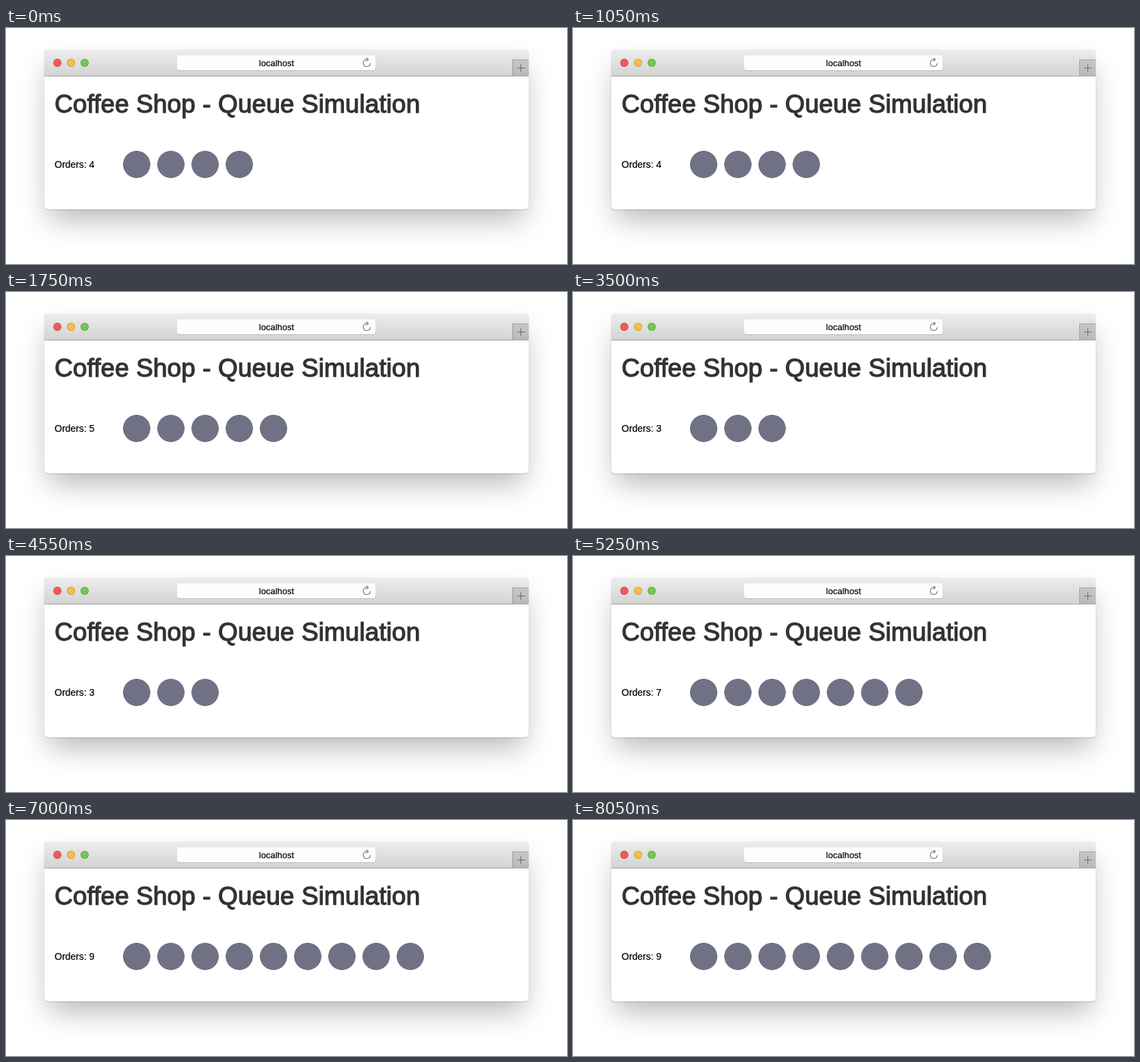
These frames come from a looping animation (820 px wide and 346 px high, 8.75 s). An HTML page:

```html
<!DOCTYPE html>
<html lang="en">
<head>
<meta charset="utf-8">
<title>Queue Simulation</title>
<style>
  @property --orders {
    syntax: "<integer>";
    inherits: true;
    initial-value: 4;
  }

  html, body {
    margin: 0;
    width: 100%;
    height: 100%;
    overflow: hidden;
    background: #fff;
  }

  body {
    position: relative;
    font-family: "Liberation Sans", Arial, sans-serif;
    color: #000;
  }

  body * { position: absolute; box-sizing: border-box; }

  .window {
    left: 56px;
    top: 32px;
    width: 708px;
    height: 234px;
    border-radius: 5px;
    background: #fff;
    box-shadow:
      0 0 1px rgba(0, 0, 0, .3),
      0 1px 1px rgba(0, 0, 0, .14),
      0 21px 40px -7px rgba(0, 0, 0, .29);
  }

  .toolbar {
    width: 708px;
    height: 39px;
    border-radius: 5px 5px 0 0;
    border-bottom: 1px solid #a2a2a2;
    background: linear-gradient(#ededed, #d3d3d3);
  }

  .light {
    top: 13px;
    width: 12px;
    height: 12px;
    border-radius: 50%;
    border: 1px solid rgba(0, 0, 0, .15);
  }
  .close { left: 13px; background: #ee5b54; }
  .minimize { left: 33px; background: #f5bd47; }
  .zoom { left: 53px; background: #75c94f; }

  .address {
    left: 194px;
    top: 8px;
    width: 290px;
    height: 22px;
    border-radius: 4px;
    background: #fdfdfd;
    box-shadow: 0 1px 0 rgba(0, 0, 0, .13);
    font-size: 13px;
    line-height: 23px;
    text-align: center;
    text-indent: 1px;
    -webkit-text-stroke: .2px #000;
  }

  .reload { left: 269px; top: 3px; }

  .new-tab {
    right: 0;
    top: 14px;
    width: 24px;
    height: 24px;
    border: solid #a0a0a0;
    border-width: 1px 0 0 1px;
    background: linear-gradient(#c6c6c6, #b9b9b9);
  }
  .new-tab svg { left: 6px; top: 6px; }

  h1 {
    left: 15px;
    top: 59px;
    margin: 0;
    font-size: 37px;
    font-weight: 400;
    line-height: 42px;
    letter-spacing: .08px;
    white-space: nowrap;
    color: #333;
    -webkit-text-stroke: 1.3px #333;
  }

  .queue {
    left: 15px;
    top: 148px;
    width: 678px;
    height: 40px;
    animation: orders 8.75s step-end infinite;
  }

  .label {
    font-size: 14px;
    line-height: 40px;
    white-space: pre;
    counter-reset: orders var(--orders);
    -webkit-text-stroke: .2px #000;
  }
  .label::after { content: counter(orders); }

  /* One dot per 50px tile, so the width sets how many show. */
  .dots {
    left: 100px;
    width: calc(var(--orders) * 50px);
    height: 40px;
    background: radial-gradient(circle at 20px 20px, #717185 19.5px, transparent 20.3px) 0 0 / 50px 40px;
  }

  @keyframes orders {
    0% { --orders: 4; }
    20% { --orders: 5; }
    40% { --orders: 3; }
    60% { --orders: 7; }
    80%, 100% { --orders: 9; }
  }
</style>
</head>
<body>
  <div class="window">
    <div class="toolbar">
      <i class="light close"></i>
      <i class="light minimize"></i>
      <i class="light zoom"></i>
      <div class="address">localhost
        <svg class="reload" width="16" height="16" fill="none" stroke="#707070" stroke-width="1.1">
          <path d="M9 3.2A5.2 5.2 0 1 0 13.6 8.4M8 1 10.7 3.3 8 5.6"/>
        </svg>
      </div>
      <div class="new-tab">
        <svg width="11" height="11" stroke="#666" stroke-width="1">
          <path d="M5.5 0V11M0 5.5H11"/>
        </svg>
      </div>
    </div>
    <h1>Coffee Shop - Queue Simulation</h1>
    <div class="queue">
      <span class="label">Orders: </span>
      <div class="dots"></div>
    </div>
  </div>
</body>
</html>
```
